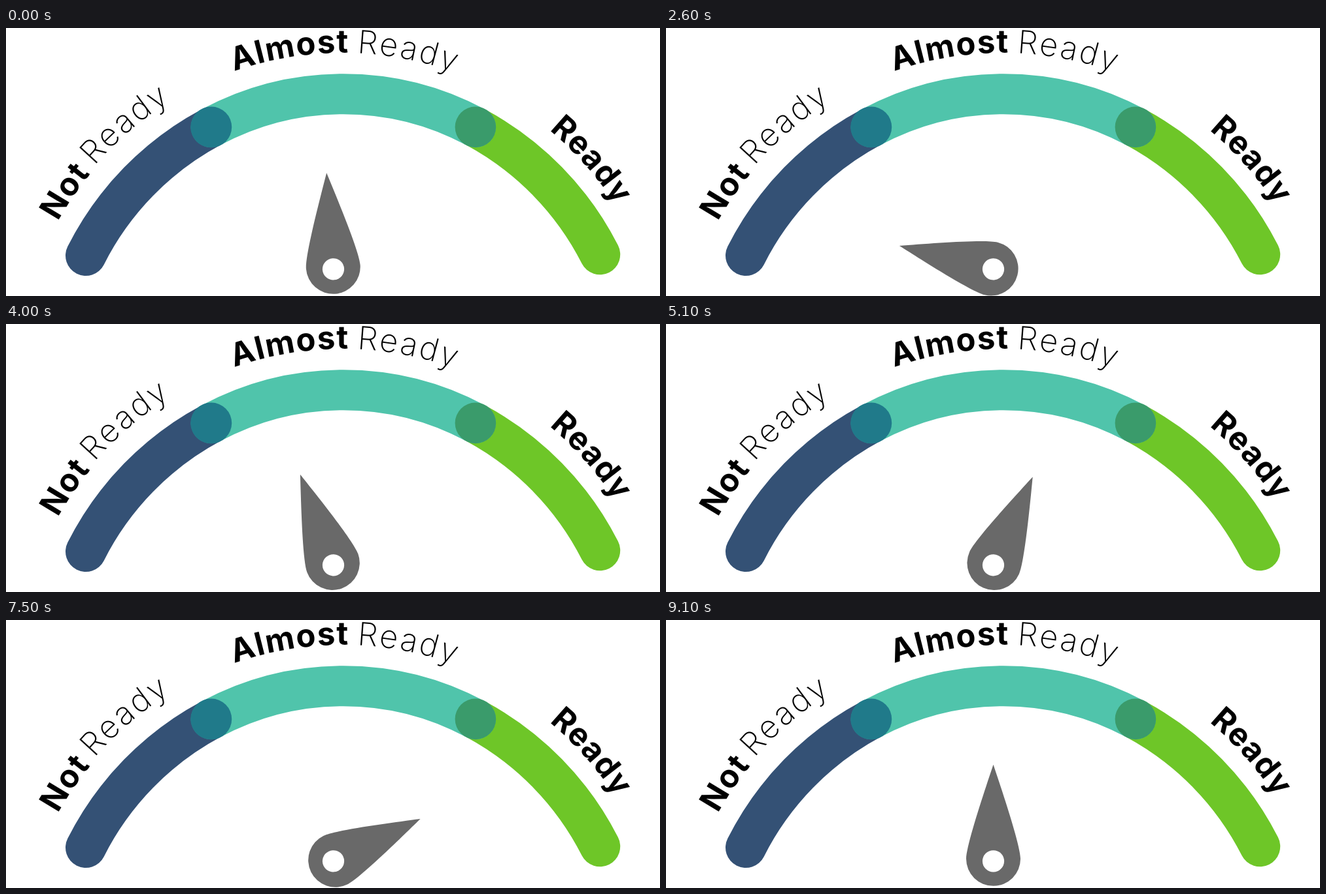
Animation, 1000 px wide and 411 px high, one loop 9.2 s. Source, as an HTML page:

```html
<!DOCTYPE html>
<html lang="en">
<head>
<meta charset="utf-8">
<title>Readiness gauge</title>
<style>
  html, body { margin: 0; height: 100%; overflow: hidden; background: #fff; }
  svg { display: block; width: 100vw; height: 100vh; }
  .band { fill: none; stroke-width: 62; stroke-linecap: round; }
  text { font: 49px Inter, "Open Sans", sans-serif; }
</style>
</head>
<body>
<svg viewBox="0 0 1000 411">
  <path class="band" stroke="#345175" d="M122 349A455 455 0 0 1 313.7 152"/>
  <path class="band" stroke="#6ec628" d="M717.9 152A455 455 0 0 1 908.2 347.3"/>
  <path class="band" stroke="#50c4ab" d="M313.7 152A427 427 0 0 1 717.9 152"/>
  <circle cx="313.7" cy="152" r="31.5" fill="#207a8a"/>
  <circle cx="717.9" cy="151.9" r="31.3" fill="#3a9b6b"/>
  <g id="labels"></g>
  <g id="needle">
    <path fill="#696969" d="M0-148C14-106 41.5-24 41.5-3.5A41.5 41.5 0 0 1-41.5-3.5C-41.5-24-14-106 0-148Z"/>
    <circle r="16.6" fill="#fff"/>
  </g>
</svg>
<script>
const labels = document.getElementById('labels');
const needle = document.getElementById('needle');

// Point on a label circle, angle in degrees clockwise from the top
function point(radius, deg) {
  const a = deg * Math.PI / 180;
  return `${515 + radius * Math.sin(a)} ${538 - radius * Math.cos(a)}`;
}

function addWord(word, weight, radius, deg, spacing) {
  const id = 'arc' + labels.childElementCount;
  const arc = `M${point(radius, deg)}A${radius} ${radius} 0 0 1 ${point(radius, deg + 35)}`;
  labels.insertAdjacentHTML('beforeend',
    `<g><path id="${id}" fill="none" d="${arc}"/>
     <text style="font-weight:${weight};letter-spacing:${spacing}px">
     <textPath href="#${id}">${word}</textPath></text></g>`);
}

addWord('Not', 700, 498, -61, 1.5);
addWord('Ready', 250, 501, -49.3, 2.9);
addWord('Almost', 700, 500, -19.4, 1.5);
addWord('Ready', 250, 500, 2.5, 2.6);
addWord('Ready', 700, 495, 39.6, 0.9);

// The needle ticks 4 degrees every 100 ms: left, back, right, back
function draw() {
  const step = (Math.floor(performance.now() / 100) + 1) % 92;
  const ticks = step < 23 ? -step : step < 69 ? step - 46 : 92 - step;
  needle.setAttribute('transform', `translate(500.5 369.8) rotate(${4 * ticks})`);
  requestAnimationFrame(draw);
}
draw();
</script>
</body>
</html>
```
